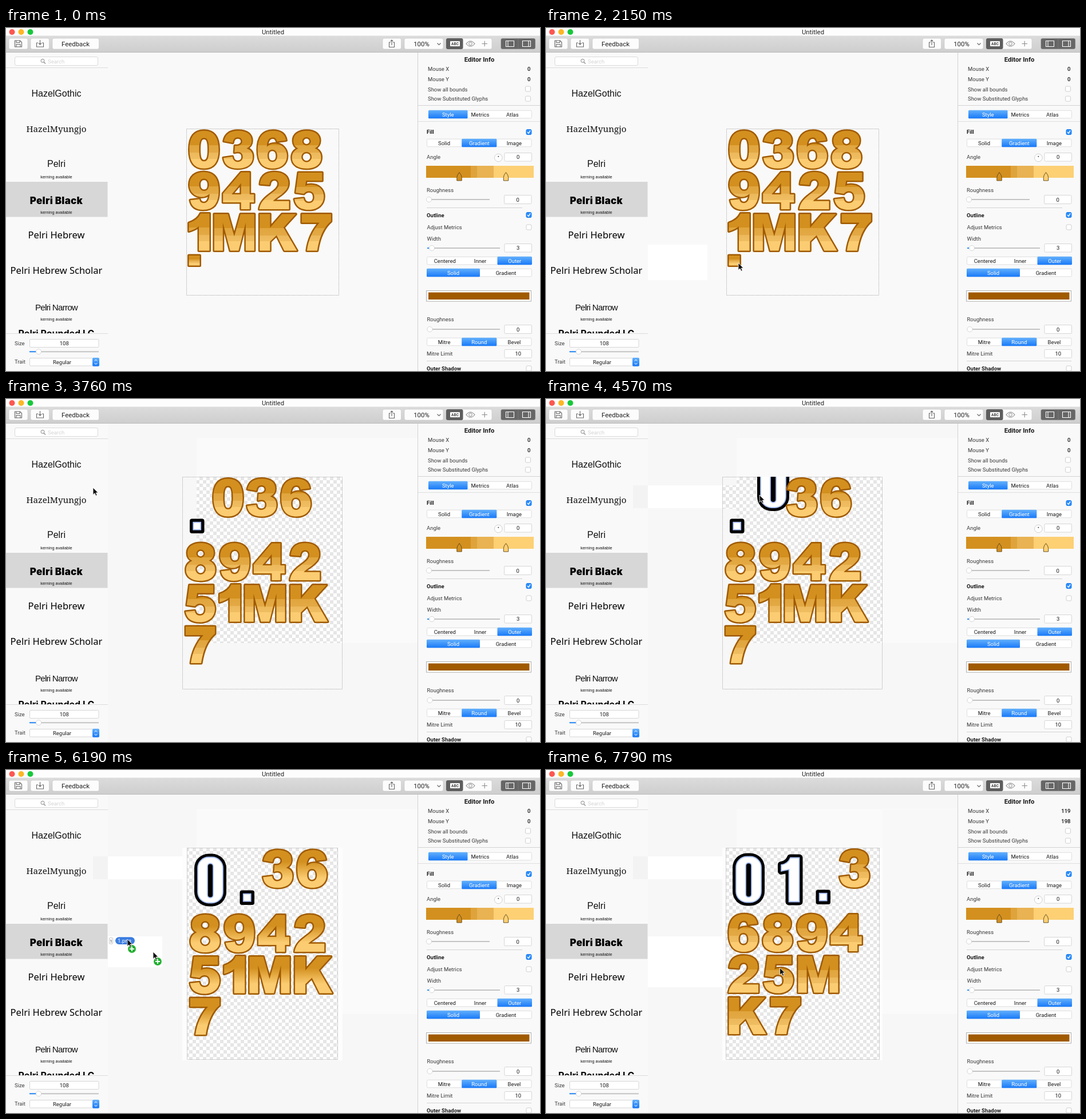
An HTML page for the animation above (8 s loop, 933 px wide and 600 px high).

```html
<!DOCTYPE html>
<html lang="en">
<head>
<meta charset="utf-8">
<title>Glyph editor</title>
<style>
html, body { margin: 0; width: 100%; height: 100%; overflow: hidden; background: #f9f9f9; }
svg { display: block; width: 933px; height: 600px; }
text { font: 9.5px Roboto, Inter, sans-serif; fill: #3a3a3a; white-space: pre; }
.b { font-weight: 700; fill: #1a1a1a; }
.sans { font-family: "Liberation Sans", sans-serif; fill: #111; }
.noto { font-family: "Noto Sans", sans-serif; fill: #000; }
.heavy { font-family: Inter, sans-serif; fill: #000; }
</style>
</head>
<body>
<svg id="stage" viewBox="0 0 933 600" xmlns="http://www.w3.org/2000/svg"></svg>
<script>
const LOOP = 8000;
const stage = document.getElementById('stage');

// ---- markup helpers ----
const rect = (x, y, w, h, fill, more = '') =>
  `<rect x="${x}" y="${y}" width="${w}" height="${h}" fill="${fill}" ${more}/>`;
const line = (x1, y, x2, color = '#d2d2d2', w = 1) =>
  `<path d="M${x1} ${y}H${x2}" stroke="${color}" stroke-width="${w}"/>`;
const circle = (x, y, r, fill, more = '') =>
  `<circle cx="${x}" cy="${y}" r="${r}" fill="${fill}" ${more}/>`;
const path = (d, more) => `<path d="${d}" fill="none" ${more}/>`;
const text = (x, y, s, o = {}) =>
  `<text x="${x}" y="${y}" class="${o.c || ''}" text-anchor="${o.a || 'start'}" style="${o.s || ''}">${s}</text>`;
const mid = (x, y, s, o = {}) => text(x, y, s, { a: 'middle', ...o });
const group = (id, body, more = '') => `<g id="${id}" ${more}>${body}</g>`;

// ---- artwork letters, cap top at 0 and baseline at 64 ----
const shapes = {}, advance = {};
function glyph(name, d, adv = 59.7) { shapes[name] = d; advance[name] = adv; }

glyph('0', 'M29 -1C46 -1 54.5 10 54.5 32S46 65 29 65 3.5 54 3.5 32 12 -1 29 -1ZM29 11.5C23 11.5 20.5 17 20.5 32S23 52.5 29 52.5 37.5 47 37.5 32 35 11.5 29 11.5Z');
glyph('3', 'M19.5 20L4 17.2C6.5 5 14.5 -1 28.5 -1C45 -1 52.5 6 52.5 16.5C52.5 22.5 49.5 27 43.5 30C51 32 54.5 37.5 54.5 44.5C54.5 57 45.5 65 28 65C13 65 5 58.5 3.2 46.5L19 44.4C20 50.5 23 53.5 28 53.5C33.5 53.5 37 50 37 44.5C37 39 33.5 36 28.5 36C26.5 36 24.5 36.4 22.5 37L23.3 25.3C24.2 25.4 25 25.5 25.8 25.5C31.5 25.5 36 22.5 36 17.8C36 13 32.5 10.5 28 10.5C23.5 10.5 20.3 13.5 19.5 20Z');
glyph('6', 'M53 15.7L37 17.7C36 12.5 33.5 10.8 29.5 10.8C23.5 10.8 20 15.5 19.3 27C23 23.5 27.5 21.5 33 21.5C45.5 21.5 54.5 30.5 54.5 42.5C54.5 56 45 65 30 65C12 65 3.4 54.5 3.4 32.5C3.4 10 12.5 -1 30.5 -1C43.5 -1 51 4.5 53 15.7ZM28.8 32C24 32 20.5 36 20.5 42.5C20.5 49.5 24 53.5 29 53.5C34 53.5 37.5 49.5 37.5 43C37.5 36.3 34 32 28.8 32Z');
let n = 0;
glyph('9', shapes['6'].replace(/-?[\d.]+/g, v => ' ' + ((n++ % 2 ? 64 : 58) - v).toFixed(1)));
glyph('8', 'M14.5 30C8.5 27 6 22.5 6 16.5C6 5.5 15 -1 29.5 -1C44 -1 52 6 52 16.3C52 22.5 49 27 43.5 29.8C51 33 54.5 38.5 54.5 45.5C54.5 58 44.5 65 29 65C13 65 3.5 57.5 3.5 46C3.5 38.5 7.5 33 14.5 30ZM21.5 17.5a7.5 7.2 0 1 0 15 0a7.5 7.2 0 1 0 -15 0zM20 45a9 9 0 1 0 18 0a9 9 0 1 0 -18 0z');
glyph('4', 'M34 52H2.5V36.5L34 -.5H49V38H56.5V52H49V64H34ZM34 38V18.5L17.5 38Z', 63.3);
glyph('2', 'M54.5 64H2.5C4 54 9 47 20.5 38.5C31.5 30.5 36.5 26 36.5 19.8C36.5 14.8 33.5 11.5 28.8 11.5C23.5 11.5 20.8 15 20.2 21.5L3.8 20.2C5.2 6.5 13 -1 29 -1C45 -1 53.5 7 53.5 18.5C53.5 27 48.5 33.5 36 42C31.5 45 28.5 47.5 26.5 49.8H54.5Z', 60.8);
glyph('5', 'M10 0H51.5V14H23.5L22 23.2C25 21.8 28.5 21 31.8 21C45.5 21 54.5 29.5 54.5 41.5C54.5 55 44.5 65 28.5 65C13.5 65 5.3 58.5 3.2 46.5L19.2 44.8C20.2 50.5 23.5 53.3 28.2 53.3C34 53.3 37.8 49.5 37.8 42.8C37.8 36.3 34 32.5 28.5 32.5C25 32.5 22.3 33.8 19.5 37L5.3 35Z', 60.2);
glyph('1', 'M38.5 -1V64H20V21.5C15 25.5 9.5 28 2.5 30V15.5C13 12 19.5 7 23 -1Z', 43.8);
glyph('M', 'M3 0H27L38 39L49 0H73V64H58V15L45.5 64H31L18 15V64H3Z', 79);
glyph('K', 'M3.5 0H21.5V24L42.5 0H66.5L45 23.5L68.5 64H46.5L33 37L21.5 48V64H3.5Z', 73.5);
glyph('7', 'M3.5 0H54.5V12.5C43 22.5 34.5 38 30.5 64H12.5C15 44 23 28 34.5 15H3.5Z');
glyph('.', 'M2.5 0H21.5V17.5H2.5Z', 25);

function row(x, y, letters, fill = 'gold') {
  return [...letters].map(ch => {
    const s = `<path transform="translate(${x} ${y})" d="${shapes[ch]}" fill="url(#${fill})" fill-rule="evenodd" stroke="#a05a00" stroke-width="5" stroke-linejoin="round" paint-order="stroke"/>`;
    x += advance[ch];
    return s;
  }).join('');
}

// ---- imported picture glyphs: black rim, white body, blue edge ----
const edge = 'stroke="#a6bdf3" stroke-width="1.8"';
const inkDot = (x, y) => rect(x, y, 25.5, 25.5, '#000', 'rx="4"') + rect(x + 6.2, y + 6.2, 13, 13, '#fff', edge);
const inkZero = (x, y) => rect(x, y, 56, 92, '#000', 'rx="25"') +
  rect(x + 6, y + 6, 44, 80, '#fff', `rx="19" ${edge}`) +
  rect(x + 23, y + 17, 10, 60, '#000', `rx="5" ${edge}`);
const onePath = 'M442.5 153.5V230.5H424.5V174L411 177V166C418 165 424 161 427 153.5Z';
const inkOne = path(onePath, 'stroke="#000" stroke-width="12" stroke-linejoin="round"') +
  `<path d="${onePath}" fill="#fff" ${edge}/>`;

const frame = (x, y, w, h) => rect(x + .5, y + .5, w - 1, h - 1, 'none', 'stroke="#bdbdbd" stroke-dasharray="1.5 .7"');
const checker = (id, x, y, w, h) => group(id, rect(x, y, w, h, 'url(#checker)'));

const layoutA = frame(315, 176, 267, 292) + row(317, 180.7, '0368') + row(317, 253, '9425') +
  row(317, 325.5, '1MK7') + row(317, 398, '.');

const lowRows = (dx, dy, fill) => row(311 + dx, 253 + dy, '8942', fill) +
  row(310.5 + dx, 325.5 + dy, '51MK', fill) + row(310.5 + dx, 398 + dy, '7', fill);

const layoutB = checker('grid', 333, 136, 255, 291) + checker('gridEdge', 309, 151, 24, 41) +
  frame(308, 136, 280, 372) + group('oldZero', row(359, 140.5, '0')) +
  group('newZero', inkZero(369, 104), 'clip-path="url(#pageTop)"') +
  row(418, 140.5, '36') + inkDot(321, 209.5) + lowRows(0, 0);

const layoutC = rect(316, 136, 264, 371, 'url(#checker)') + frame(316, 136, 264, 371) +
  inkZero(329, 146.5) + inkDot(408.5, 210.5) + row(446, 141, '36', 'smooth') + lowRows(8, 1, 'smooth');

const layoutD = rect(314, 136, 269, 371, 'url(#checker)') + frame(314, 136, 269, 371) +
  inkZero(326, 145.5) + inkOne + inkDot(471.5, 209.5) + row(510, 140.5, '3') +
  row(316, 253, '6894') + row(316.5, 325.5, '25M') + row(316, 398, 'K7');

// ---- interface controls ----
const field = (x, y, w, h, v) => rect(x + .5, y + .5, w - 1, h - 1, '#fff', 'rx="1.5" stroke="#d6d6d6"') +
  mid(x + w / 2, y + h / 2 + 3.5, v, { c: 'b', s: 'font-weight:400' });
const check = (x, y, on) => rect(x + .5, y + .5, 9, 9, on ? '#2a8cfb' : '#fff', `rx="2" stroke="${on ? '#1c7df0' : '#cfcfcf'}"`) +
  (on ? path(`M${x + 2.5} ${y + 5}l2 2.3L${x + 7.6} ${y + 2.3}`, 'stroke="#fff" stroke-width="1.4"') : '');
const slider = (x1, x2, y, knob, filled) => line(x1, y, x2, '#c4c4c4', 2) +
  (filled ? line(x1, y, knob, '#2a8cfb', 2) : '') + circle(knob, y, 4.6, '#fff', 'stroke="#cdcdcd" stroke-width=".8"');
function segments(x, y, w, names, on, widths) {
  let left = x, marks = '', labels = '';
  names.forEach((s, i) => {
    const sw = widths ? widths[i] : w / names.length;
    if (i === on) marks += rect(left, y, sw, 14.5, 'url(#blue)', 'rx="1.5"');
    labels += mid(left + sw / 2, y + 10.8, s, { s: `fill:${i === on ? '#fff' : '#1a1a1a'}` });
    left += sw;
  });
  return rect(x + .5, y + .5, w - 1, 13.5, '#fff', 'rx="2" stroke="#dedede"') + marks + labels;
}
const tool = (x, w, fill = '#fcfcfc') => rect(x, 18, w, 19, fill, 'rx="3" stroke="#c6c6c6" stroke-width=".6"');
const icon = (d, color = '#666') => path(d, `stroke="${color}" stroke-width="1.1"`);

function titleBar() {
  const big = 'font-size:11.4px;fill:#222';
  return rect(0, 0, 933, 14, '#fdfdfd') + rect(0, 13.5, 933, 29, 'url(#bar)') + line(0, 42.5, 933, '#bcbcbc') +
    circle(10.5, 7, 5, '#fc5752') + circle(26.5, 7, 5, '#fdb624') + circle(42.5, 7, 5, '#17c83b') +
    mid(466.5, 11, 'Untitled', { s: big }) +
    tool(5, 33) + icon('M15.5 22h9l3 3v8h-12zM18 22v3.5h6V22M18 33v-4.500h7V33') +
    tool(43, 32.5) + icon('M56 26h-2.500v7h12v-7h-2.500M59.500 21v8m-2.500-2.500l2.500 2.500 2.500-2.500') +
    tool(81, 81.5) + mid(121.5, 31.5, 'Feedback', { s: big }) +
    tool(658, 32.5) + icon('M672 25h-2.500v8.500h9V25H676M674 30v-9m-2.200 2.200l2.200-2.200 2.200 2.200') +
    tool(696, 68) + mid(726, 31.5, '100%', { s: big }) + icon('M753.500 26.500l3 3 3-3') +
    tool(769, 80) + rect(769, 18, 29.5, 19, '#5e5e5e', 'rx="3"') +
    rect(776, 23, 17, 9, '#fff', 'rx="1"') + mid(784.5, 30, 'ABC', { s: 'font-size:6.5px;font-weight:700;fill:#444' }) +
    icon('M804 27.500q7.500-9 15 0q-7.500 9-15 0z', '#8a8a8a') + circle(811.5, 27.5, 2.8, 'none', 'stroke="#8a8a8a"') +
    icon('M831.500 27.500h9.500M836.200 22.800v9.500', '#8a8a8a') +
    tool(864.5, 60.5, '#666') + line(894.7, 27.5, 895.2, '#888', 19) +
    icon('M873.500 22.500h14v10h-14zM877 22.500v10M902.500 22.500h14v10h-14zM913 22.500v10', '#fff');
}

function sidebar() {
  const cap = y => mid(88, y, 'kerning available', { c: 'sans', s: 'font-size:7.4px' });
  const name = (y, s, c, size, more = '') => mid(88, y, s, { c, s: `font-size:${size}px;${more}` });
  return rect(15.5, 50.5, 145, 15, '#fff', 'rx="2.5" stroke="#dadada"') +
    circle(64, 57.3, 3, 'none', 'stroke="#888"') + icon('M66 59.500l3 3', '#888') +
    text(73, 61.5, 'Search', { s: 'fill:#d4d4d4' }) + line(0, 69.5, 178, '#dcdcdc') +
    rect(0, 269, 177.5, 61.5, '#d7d7d7') +
    name(120, 'HazelGothic', 'sans', 16) +
    name(182, 'HazelMyungjo', '', 15.2, 'font-family:"Noto Serif",serif;fill:#111'.replace(/"/g, "'")) +
    name(243, 'Pelri', 'sans', 16) + cap(263) +
    name(308, 'Pelri Black', 'heavy', 17, 'font-weight:900;letter-spacing:.3px') + cap(325) +
    name(367.5, 'Pelri Hebrew', 'noto', 16.5) +
    name(429.5, 'Pelri Hebrew Scholar', 'noto', 16.5) +
    name(494, 'Pelri Narrow', 'sans', 15.2, 'letter-spacing:-.8px') + cap(512) +
    group('cut', name(539.5, 'Pelri Rounded LC', 'heavy', 16, 'font-weight:700'), 'clip-path="url(#listEnd)"') +
    line(0, 534.5, 178, '#dcdcdc') +
    text(15, 555, 'Size') + field(41, 544, 121.5, 15, '108') + slider(41, 162, 566.2, 57, true) +
    text(15, 587.3, 'Trait') + field(41, 577, 121.5, 14.5, '') + mid(98, 587.5, 'Regular', { s: 'fill:#1a1a1a' }) +
    rect(151, 576.7, 12, 15, 'url(#blue)', 'rx="2"') +
    path('M154.800 582.500l2.200-2.500 2.200 2.500M154.800 586l2.200 2.500 2.200-2.500', 'stroke="#fff"');
}

function inspector() {
  const value = (id, y) => `<text id="${id}" x="916.5" y="${y}" text-anchor="end" style="font-weight:500;fill:#111"></text>`;
  const handle = (x, fill) => `<path d="M${x} 252.500q4.200 5 4.200 9v5.500h-8.400v-5.500q0-4 4.200-9z" fill="${fill}" stroke="#5c4317" stroke-width=".9"/>`;
  return rect(719, 43, 214, 557, '#f9f9f9') + rect(719, 43, 1, 557, '#d2d2d2') +
    mid(827, 59.3, 'Editor Info', { c: 'b', s: 'font-size:11.3px' }) +
    text(737, 75.3, 'Mouse X') + value('mouseX', 75.3) + text(737, 93.3, 'Mouse Y') + value('mouseY', 93.3) +
    text(737, 110.8, 'Show all bounds') + check(907, 101.5) +
    text(737, 127.2, 'Show Substituted Glyphs') + check(907, 118.7) + line(720, 135.5, 933) +
    segments(738, 143.8, 181, ['Style', 'Metrics', 'Atlas'], 0, [68.5, 44, 68.5]) + line(720, 163.5, 933, '#dedede') +
    text(735, 185, 'Fill', { c: 'b' }) + check(908.5, 177, true) +
    segments(735, 193.7, 183.5, ['Solid', 'Gradient', 'Image'], 1) +
    text(735, 229, 'Angle') + circle(860.3, 227, 6.8, '#fff', 'stroke="#d0d0d0"') + circle(860.3, 224.8, 1, '#444') +
    field(870.5, 218, 48.5, 15.5, '0') +
    rect(734, 241, 188, 21, '#d3901f') + rect(812, 241, 11, 21, '#dfa33b') +
    rect(823, 241, 29, 21, '#e9b252') + rect(852, 241, 70, 21, '#fdd074') + handle(792, '#d3901f') + handle(873.5, '#fdd074') +
    text(735, 287, 'Roughness') + slider(735, 845, 300, 739) + field(870, 292, 48.5, 16, '0') + line(735, 314.5, 902) +
    text(735, 330.8, 'Outline', { c: 'b' }) + check(908.5, 322, true) +
    text(735.5, 351.7, 'Adjust Metrics') + check(908.5, 343.5) +
    text(735.5, 371.8, 'Width') + slider(736, 863, 385, 744, true) + field(870.5, 377, 48.5, 15.5, '3') +
    segments(735, 399.8, 184, ['Centered', 'Inner', 'Outer'], 2, [63.5, 60, 60.5]) +
    segments(735, 420.8, 184, ['Solid', 'Gradient'], 0, [93, 91]) +
    rect(734.5, 459.5, 183, 18.5, '#fff', 'stroke="#b0b0b0"') + rect(738, 462.5, 176.5, 12.5, '#a05a00') +
    text(735.5, 513, 'Roughness') + slider(737, 863, 527, 740.5) + field(870.5, 519, 48.5, 16, '0') +
    segments(735, 541.7, 183.5, ['Mitre', 'Round', 'Bevel'], 1) +
    text(735, 573.3, 'Mitre Limit') + field(870.5, 562, 48.5, 15.5, '10') + line(735, 582.5, 918) +
    text(735, 598.5, 'Outer Shadow', { c: 'b' }) + check(908.5, 590.5);
}

// ---- parts shown only for a span of time: from, to, id, markup ----
const spans = [
  [1080, 2420, 'p1', rect(178, 379, 104, 62, '#fff')],
  [2420, LOOP, 'p2', rect(178, 43, 541, 557, '#f7f7f7')],
  [2690, LOOP, 'p3', rect(333, 68, 386, 359, '#fafafa')],
  [7790, LOOP, 'p4', rect(588, 69, 131, 298, '#f8f8f8')],
  [4030, LOOP, 'p5', rect(152, 151, 26, 40, '#f3f3f3') + rect(178, 151, 130, 40, '#fff')],
  [4840, LOOP, 'p6', rect(308, 136, 280, 372, '#fdfdfd')],
  [6190, 6450, 'p7', rect(178, 291, 95, 54, '#fff')],
  [6450, LOOP, 'p8', rect(178, 291, 130, 89, '#fff')],
  [0, 2420, 'a', layoutA],
  [2420, 4840, 'b', layoutB],
  [4840, 7530, 'c', layoutC],
  [7530, LOOP, 'd', layoutD]
];
const inner = [[2690, 4840, 'grid'], [4030, 4840, 'gridEdge'], [2420, 4570, 'oldZero'], [4570, 4840, 'newZero']];

// ---- pointer and dragged file: time, label, file place, pointers, plus badge ----
const moves = [
  [0],
  [810, '', 0, [[173, 379]]],
  [1080, '.png', [207, 402], [[237, 411], [267, 416]], 1],
  [1350, '.png', [272, 402], [[302, 411], [309, 415]], 1],
  [1610, '.png', [295, 402], [[325, 411], [329, 416]], 1],
  [1880, '', 0, [[337, 412]], 1],
  [2150, '', 0, [[336, 411]]],
  [2690],
  [3760, '', 0, [[152, 155]]],
  [4030, '0.png', [311, 153], [[343, 166]], 1],
  [4300, '0.png', [345, 153], [[376, 170]], 1],
  [4570, '', 0, [[373, 168]]],
  [4840],
  [6190, '1.png', [180, 293], [[212, 296], [257, 318]], 1],
  [6450, '1.png', [316, 346], [[348, 352], [377, 355]], 1],
  [6720, '1.png', [363, 346], [[395, 350], [401, 354]], 1],
  [6990, '1.png', [382, 346], [[415, 349]], 1],
  [7260, '1.png', [382, 346], [[414, 349]], 1],
  [7530],
  [7790, '', 0, [[408.5, 346]]]
];
const pointer = (x, y) => `<path transform="translate(${x} ${y})" d="M0 0V12.500L3 9.800L5 14.300L7.200 13.300L5.200 9H9Z" fill="#111" stroke="#fff" stroke-width=".8"/>`;
const badge = (x, y) => circle(x, y, 7.2, '#1fae2f', 'stroke="#e4f3e4" stroke-width=".8"') +
  path(`M${x - 4} ${y}h8M${x} ${y - 4}v8`, 'stroke="#fff" stroke-width="1.8"');
function dragMarkup([, label, file, points = [], plus]) {
  let s = '';
  if (file) {
    const [x, y] = file;
    s += rect(x + .5, y + .5, 6, 10.5, '#fdfdfd', 'rx="1" stroke="#b5b5b5" stroke-width=".8"') +
      (label === '.png' ? rect(x + 2.5, y + 7, 2, 2, '#333') : mid(x + 3.5, y + 8.5, label[0], { s: 'font-size:7.5px;fill:#333' })) +
      rect(x + 11, y - .7, label.length > 4 ? 34 : 32, 12.6, '#3b7de0', 'rx="6.3"') +
      text(x + (label.length > 4 ? 15 : 18.5), y + 9, label, { s: 'fill:#fff' });
  }
  for (const [x, y] of points) s += (plus ? badge(x + 8, y + 17) : '') + pointer(x, y);
  return s;
}

const stops = list => list.map(([o, c]) => `<stop offset="${o}" stop-color="${c}"/>`).join('');
const gradient = (id, list) => `<linearGradient id="${id}" x1="0" y1="0" x2="0" y2="1">${stops(list)}</linearGradient>`;
const [dark, warm, pale, light] = ['#d3901f', '#e0a53d', '#ecb85b', '#fbcc71'];

stage.innerHTML = '<defs>' +
  gradient('gold', [[.38, dark], [.38, warm], [.58, '#e3a945'], [.58, pale], [.75, '#f0be62'], [.75, light]]) +
  gradient('smooth', [[.31, dark], [.745, light]]) +
  gradient('blue', [[0, '#63b0fc'], [1, '#1879f8']]) +
  gradient('bar', [[0, '#dcdcdc'], [1, '#cecece']]) +
  '<pattern id="checker" x="308" y="136" width="12" height="12" patternUnits="userSpaceOnUse">' +
  rect(0, 0, 12, 12, '#fff') + rect(6, 0, 6, 6, '#e6e6e6') + rect(0, 6, 6, 6, '#e6e6e6') + '</pattern>' +
  `<clipPath id="pageTop">${rect(308, 136, 280, 372, '#000')}</clipPath>` +
  `<clipPath id="listEnd">${rect(0, 500, 178, 34, '#000')}</clipPath></defs>` +
  rect(0, 0, 933, 600, '#f9f9f9') +
  spans.map(([, , id, body]) => group(id, body)).join('') +
  sidebar() + inspector() + titleBar() + group('drag', '');

const $ = id => document.getElementById(id);
const timed = [...spans, ...inner].map(([from, to, id]) => [from, to, $(id)]);
const drag = $('drag'), mouseX = $('mouseX'), mouseY = $('mouseY');
let shown = null;

function render(t) {
  for (const [from, to, node] of timed) node.style.display = t >= from && t < to ? '' : 'none';
  const [mx, my] = t >= 7790 ? [119, 198] : t >= 2420 && t < 2690 ? [36, 119] : [0, 0];
  mouseX.textContent = mx;
  mouseY.textContent = my;
  const move = moves.filter(m => m[0] <= t).pop();
  if (move !== shown) drag.innerHTML = dragMarkup(shown = move);
}

const start = performance.now();
function tick() {
  render((performance.now() - start) % LOOP);
  requestAnimationFrame(tick);
}
tick();
</script>
</body>
</html>
```
